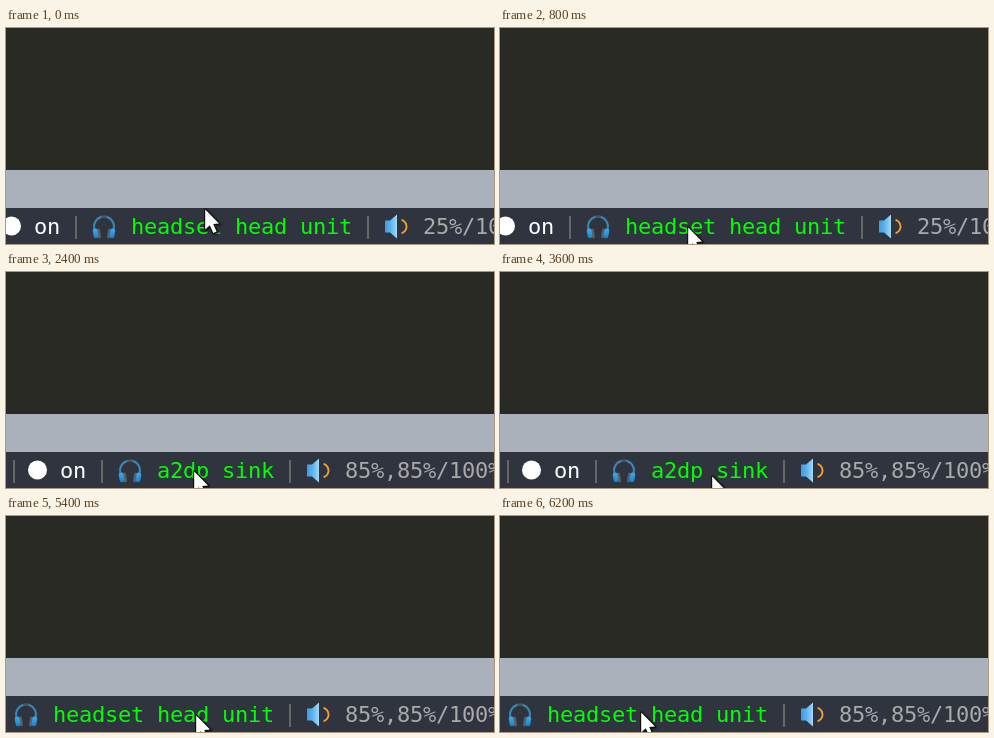
Recreate the animation shown at these times as an HTML page with a canvas. Size 488 by 216 pixels, loop 8 s.

```html
<!DOCTYPE html>
<html lang="en">
<head>
<meta charset="utf-8">
<title>Status bar</title>
<style>
  html, body { margin: 0; width: 100%; height: 100%; overflow: hidden; background: #292a24; }
  canvas { display: block; }
</style>
</head>
<body>
<canvas id="stage" width="488" height="216"></canvas>
<script>
const ctx = document.getElementById('stage').getContext('2d');
const LOOP = 8000;
const STEP = 100;
const CELL = 13;

const pointerStart = { x: 198, y: 179 };
const pointerMoves = [
  { from: 200, to: 500, x: 192, y: 193 },
  { from: 600, to: 800, x: 187, y: 197 },
  { from: 3300, to: 3600, x: 211, y: 202 },
  { from: 5000, to: 5700, x: 173, y: 193 },
  { from: 5700, to: 5900, x: 154, y: 194 },
  { from: 5900, to: 6200, x: 140, y: 194 }
];

// The screen refreshes once per STEP, so the pointer jumps between whole pixels.
function pointerAt(t) {
  const time = Math.floor(t / STEP) * STEP;
  let { x, y } = pointerStart;
  for (const move of pointerMoves) {
    const p = Math.min(1, Math.max(0, (time - move.from) / (move.to - move.from)));
    x += (move.x - x) * p;
    y += (move.y - y) * p;
  }
  return [Math.round(x), Math.round(y)];
}

// Monospaced text on a whole-pixel cell grid.
function text(str, x, color) {
  ctx.font = '22px "DejaVu Sans Mono", monospace';
  ctx.fillStyle = color;
  [...str].forEach((char, i) => ctx.fillText(char, x + i * CELL, 206));
}

function separator(x) {
  ctx.fillStyle = '#666';
  ctx.fillRect(x, 188, 2, 23);
}

function trace(points) {
  ctx.beginPath();
  points.forEach(([x, y]) => ctx.lineTo(x, y));
  ctx.closePath();
}

function arc(r, from, to, width, color) {
  ctx.beginPath();
  ctx.arc(0, 0, r, from * Math.PI, to * Math.PI);
  ctx.lineWidth = width;
  ctx.strokeStyle = color;
  ctx.stroke();
}

function disc(x, y, r, color) {
  ctx.beginPath();
  ctx.arc(x, y, r, 0, 2 * Math.PI);
  ctx.fillStyle = color;
  ctx.fill();
}

function pill(x, y, w, h, color) {
  ctx.beginPath();
  ctx.roundRect(x, y, w, h, w / 2);
  ctx.fillStyle = color;
  ctx.fill();
}

function gradient(x0, y0, x1, y1, ...colors) {
  const g = ctx.createLinearGradient(x0, y0, x1, y1);
  colors.forEach((c, i) => g.addColorStop(i / (colors.length - 1), c));
  return g;
}

function at(x, y, draw) {
  ctx.save();
  ctx.translate(x, y);
  draw();
  ctx.restore();
}

function wifi() {
  const color = '#ccff00';
  for (let i = 1; i <= 3; i++) arc(1.2 + i * 4.3, 1.24, 1.76, 2.9, color);
  disc(0, 0, 2.5, color);
}

function headphones() {
  ctx.lineCap = 'round';
  arc(10, 0.9, 2.1, 2.6, '#455a64');
  arc(10, 0.95, 1.4, 1.5, '#2f8fc8');
  arc(10, 1.6, 2.05, 1.5, '#2f8fc8');
  for (const side of [-1, 1]) {
    ctx.save();
    ctx.scale(side, 1);
    ctx.rotate(0.16);
    pill(4.6, 1, 3.2, 10, '#51626b');
    pill(7, 0.5, 4.8, 9.8, gradient(7, 0, 11, 10, '#40b4f4', '#1c7fc6'));
    ctx.restore();
  }
}

function speaker() {
  trace([[-11, -6], [-6, -6], [1, -12], [1, 12], [-6, 6], [-11, 6]]);
  ctx.fillStyle = gradient(-11, 0, 1, 0, '#3b9be2', '#5fb5ee', '#a5d8f8');
  ctx.fill();
  ctx.lineCap = 'round';
  at(3.5, 0, () => arc(7, 1.63, 2.37, 1.9, '#f2a032'));
}

function pointer() {
  trace([[1.2, 2.5], [1.2, 22.5], [5.8, 18.2], [9.3, 26], [12.6, 24.6], [9.2, 17], [15, 16.6]]);
  ctx.shadowColor = 'rgba(0,0,0,.5)';
  ctx.shadowBlur = 2;
  ctx.shadowOffsetX = ctx.shadowOffsetY = 1;
  ctx.lineWidth = 2.4;
  ctx.lineJoin = 'round';
  ctx.strokeStyle = '#111';
  ctx.stroke();
  ctx.shadowColor = 'transparent';
  ctx.fillStyle = '#fff';
  ctx.fill();
}

function render(t) {
  ctx.fillStyle = '#292a24';
  ctx.fillRect(0, 0, 488, 142);
  ctx.fillStyle = '#abb1bb';
  ctx.fillRect(0, 142, 488, 38);
  ctx.fillStyle = '#2f343f';
  ctx.fillRect(0, 180, 488, 36);

  const profile = t >= 2300 && t < 4800 ? 'a2dp sink' : 'headset head unit';
  const loud = t >= 2400;
  const volumeX = loud ? 339 : 417;
  const profileX = volumeX - 71 - profile.length * CELL;

  // Blocks are laid out leftwards from the volume reading.
  text(loud ? '85%,85%/100%' : '25%/100%', volumeX, '#a9a9a9');
  at(volumeX - 27, 198.5, speaker);
  separator(volumeX - 56);
  text(profile, profileX, '#00ff00');
  at(profileX - 27, 198.5, headphones);
  separator(profileX - 56);
  text('on', profileX - 97, '#fff');
  disc(profileX - 119.5, 198, 9.5, '#fff');
  separator(profileX - 144);
  text('88%', profileX - 198, '#ccff00');
  at(profileX - 222, 203.5, wifi);

  at(...pointerAt(t), pointer);
}

const start = performance.now();
function tick() {
  render((performance.now() - start) % LOOP);
  requestAnimationFrame(tick);
}
tick();
</script>
</body>
</html>
```
